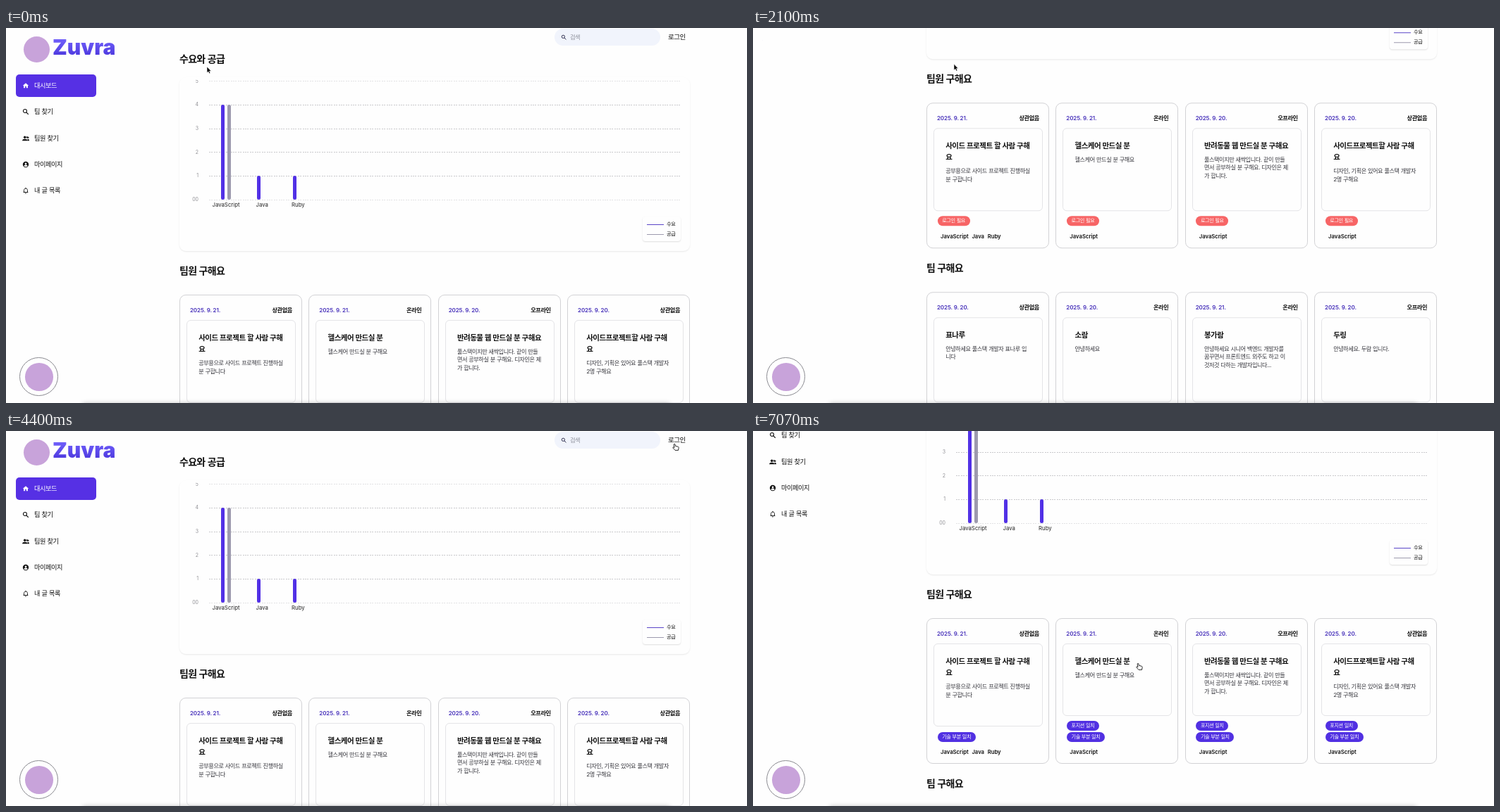
An HTML page for the animation above (7240 ms loop, 1051 px wide and 533 px high).

```html
<!DOCTYPE html>
<html lang="ko">
<head>
<meta charset="utf-8">
<title>Dashboard</title>
<style>
html, body { margin: 0; width: 100%; height: 100%; overflow: hidden; background: #fefefe; }
#stage { position: relative; width: 1051px; height: 533px; overflow: hidden; color: #111;
  font-family: Inter, "Noto Sans CJK KR", "Noto Sans CJK", sans-serif; }
#stage div, #stage svg { position: absolute; box-sizing: border-box; }
#page { left: 0; top: 0; width: 1051px; height: 901px; }
.t { white-space: pre; line-height: 20px; }
.ko { letter-spacing: -.05em; word-spacing: .04em; }
.word { font-weight: 900; background: linear-gradient(#6d5cf8 25%, #4f3be0 80%);
  -webkit-background-clip: text; background-clip: text; color: transparent; }
.mark { border-radius: 50%; background: #c8a3da; }
.pill { height: 14px; line-height: 14px; padding: 0 6.7px; border-radius: 7px; color: #fff;
  font-size: 7.1px; white-space: pre; background: #5130e2; }
.out .pill { background: #f76566; }
#page.logged .out, #page:not(.logged) .in { display: none; }
#page.logged .short { height: 103px !important; }
.card { border: 1px solid #d2d2d5; border-radius: 9px; background: #fefefe; }
.inner { border: 1px solid #e4e4e7; border-radius: 6px; }
.chart { border-radius: 9px; background: #fefefe; box-shadow: 0 1px 2px rgba(0,0,0,.09); }
.legend { border-radius: 4px; background: #fefefe; box-shadow: 0 1px 2px rgba(0,0,0,.13); }
#dock { left: 110px; top: 535px; width: 830px; height: 10px; box-shadow: 0 0 7px 1px rgba(0,0,0,.3); }
#chat { left: 19px; top: 468px; width: 55px; height: 55px; border: .7px solid #8a8a90;
  border-radius: 50%; background: #fefefe; }
#shade { left: 0; top: 0; width: 1051px; height: 533px; background: rgba(0,0,0,.44); }
#box { left: 398px; top: 176px; width: 255px; height: 177px; border-radius: 6px; background: #fff;
  box-shadow: 0 3px 9px rgba(0,0,0,.15); }
#cursor { left: 0; top: 0; width: 16px; height: 16px; overflow: visible; }
</style>
</head>
<body>
<div id="stage">
  <div id="page"></div>
  <div id="dock"></div>
  <div id="chat"></div>
  <div id="modal"><div id="shade"></div><div id="box"></div></div>
  <svg id="cursor" viewBox="0 0 16 16">
    <path id="arrow" d="M0 0V8.6L2 6.9 3.3 9.8 4.8 9.1 3.5 6.3H6Z" fill="#000" stroke="#fff" stroke-width=".6"/>
    <path id="hand" d="M1.2 1.2C1.2 0 2.8 0 3 1.1L3.5 3.4 6.9 4.2C8 4.5 8.3 5.2 8.1 6.2L7.5 9.4H3L0.1 6.2C-.6 5.2.5 4.5 1.2 5.1L2 5.6Z"
      fill="#fff" stroke="#111" stroke-width=".9" stroke-linejoin="round"/>
  </svg>
</div>
<script>
const LOOP = 7240, STEP = 100;
const $ = id => document.getElementById(id);
const page = $('page'), modal = $('modal'), box = $('box');
const PURPLE = '#5130e6', GRAY = '#9d9aae';

function add(parent, cls, x, y, w, h, style = '') {
  const el = document.createElement('div');
  el.className = cls;
  el.style.cssText = `left:${x}px;top:${y}px;` + (w ? `width:${w}px;height:${h}px;` : '') + style;
  parent.appendChild(el);
  return el;
}

// y is the middle of the line; align moves the anchor along x
function text(parent, str, x, y, size, { weight = 400, color = '#111', align = 0, spacing } = {}) {
  const ko = /[가-힣]/.test(str) ? ' ko' : '';
  const el = add(parent, 't' + ko, x, y - 10, 0, 0,
    `font-size:${size}px;font-weight:${weight};color:${color};transform:translateX(${-align * 100}%);`
    + (spacing ? `letter-spacing:${spacing}em;` : ''));
  el.textContent = str;
  return el;
}

function svg(parent, x, y, size, body) {
  parent.insertAdjacentHTML('beforeend',
    `<svg viewBox="0 0 24 24" style="left:${x - size / 2}px;top:${y - size / 2}px;width:${size}px;height:${size}px">${body}</svg>`);
  return parent.lastElementChild;
}

function brand(parent, cx, cy, r, x, y, size) {
  add(parent, 'mark', cx - r, cy - r, 2 * r, 2 * r);
  add(parent, 'word', x, y - 18, 0, 0, `font-size:${size}px;line-height:36px`).textContent = 'Zuvra';
}

const searchIcon = '<g fill="none" stroke="currentColor" stroke-width="2.6"><circle cx="9.5" cy="9.5" r="6"/><path d="M14 14l7 7"/></g>';
const icons = [
  '<path fill="currentColor" d="M10 20v-6h4v6h5v-8h3L12 3 2 12h3v8z"/>',
  searchIcon,
  '<g fill="currentColor"><circle cx="9" cy="8" r="4.3"/><path d="M0 20c0-8 18-8 18 0zM18 20h6c0-4-2-6-6-6zM15 4a4 4 0 1 1 0 8zM19 6h2v6h-2zM17 8h6v2h-6z"/></g>',
  '<circle cx="12" cy="12" r="10" fill="currentColor"/><g fill="#fff"><circle cx="12" cy="9" r="3.3"/><path d="M5.5 17c2-5 11-5 13 0-3 4-10 4-13 0z"/></g>',
  '<path fill="none" stroke="currentColor" stroke-width="2.2" d="M4 18h16M6 18v-7c0-8 12-8 12 0v7M10 21.5h4M12 2v3"/>'
];

// Sidebar and top bar
brand(page, 43, 30, 18.5, 66, 27, 30);
const active = add(page, '', 14, 65.5, 114, 32.5, 'border-radius:5px;background:#5630e4');
const nav = ['대시보드', '팀 찾기', '팀원 찾기', '마이페이지', '내 글 목록'].map((label, i) => {
  const y = 82 + i * 37.35;
  return [svg(page, 28, y, 10, icons[i]), text(page, label, 40, y, 9.2)];
});
add(page, '', 778, 1, 150, 23.5, 'border-radius:12px;background:#f1f4fc');
svg(page, 791.5, 13, 8.5, searchIcon).style.color = '#222244';
text(page, '검색', 800, 13, 8.2, { color: '#8b8e99' });
text(page, '로그인', 939, 13, 9.5);

// Chart
const heading = (str, y) => text(page, str, 246, y, 14, { weight: 700 });
heading('수요와 공급', 43.5);
add(page, 'chart', 246, 70, 724, 247);
for (let v = 0; v <= 5; v++) {
  const y = 244 - v * 33.65;
  add(page, '', 288, y - .5, 669, 1,
    `background:repeating-linear-gradient(90deg,${v % 5 ? '#c9c9cc' : '#e2e2e4'} 0 2px,transparent 2px 3.4px)`);
  const label = text(page, v ? String(v) : '00', 273, y, 7, { color: '#8f8f94', align: 1 });
  if (v === 5) label.style.clipPath = 'inset(8px 0 0 0)';
}
const bar = (x, v, color) => add(page, '', x, 244 - v * 33.65, 5, v * 33.65, `border-radius:2.5px;background:${color}`);
bar(304.5, 4, PURPLE);
bar(314, 4, GRAY);
bar(356, 1, PURPLE);
bar(407.3, 1, PURPLE);
['JavaScript', 'Java', 'Ruby'].forEach((s, i) =>
  text(page, s, 312 + i * 51.2, 250.7, 7.8, { color: '#222', align: .5 }));
add(page, 'legend', 902.5, 268, 54.5, 34.5);
[['수요', '#5a45c8'], ['공급', GRAY]].forEach(([s, c], i) => {
  add(page, '', 909, 278.5 + i * 14, 24, 1.3, `background:${c}`);
  text(page, s, 937, 279.3 + i * 14, 7.2);
});

// Cards: day, place, title lines, description lines, skills, sprout
const ANY = '상관없음', ON = '온라인', OFF = '오프라인', JS = 'JavaScript';
const members = [
  [21, ANY, '사이드 프로젝트 할 사람 구해|요', '공부용으로 사이드 프로젝트 진행하실|분 구합니다', [JS, 'Java', 'Ruby']],
  [21, ON, '헬스케어 만드실 분', '헬스케어 만드실 분 구해요', [JS]],
  [20, OFF, '반려동물 웹 만드실 분 구해요', '풀스택이지만 새싹입니다. 같이 만들|면서 공부하실 분 구해요. 디자인은 제|가 합니다.', [JS]],
  [20, ANY, '사이드프로젝트할 사람 구해|요', '디자인, 기획은 있어요 풀스택 개발자|2명 구해요', [JS]]
];
const teams = [
  [20, ANY, '표나루', '안녕하세요 풀스택 개발자 표나루 입|니다', [JS, 'TypeScript', 'Python']],
  [20, ON, '소람', '안녕하세요', [JS, 'C++']],
  [21, ON, '봉가람', '안녕하세요 시니어 백엔드 개발자를|꿈꾸면서 프론트엔드 외주도 하고 이|것저것 다하는 개발자입니다...', [JS], true],
  [20, OFF, '두링', '안녕하세요. 두람 입니다.', [JS], true]
];
const sprout = '<path d="M12 23V11" stroke="#3d9a3a" stroke-width="3"/><path fill="#4db848" d="M12 12C11 4 6 2 0 3c1 7 6 10 12 9zM12 12c1-8 6-10 12-9-1 7-6 10-12 9z"/>';

function card([day, place, title, desc, skills, young], i, top, isMember) {
  const c = add(page, 'card', 246 + i * 183.35, top, 174, 207);
  const g = add(c, '', -.5, -.5, 174, 206);
  add(g, 'inner' + (isMember && i ? ' short' : ''), 9.5, 35.5, 155, isMember ? 118 : 121);
  text(g, `2025. 9. ${day}.`, 14.5, 21, 8, { weight: 600, color: '#4630ba', spacing: -.015 });
  text(g, place, 159.5, 21, 8.2, { weight: 600, align: 1 });
  let y = 61;
  title.split('|').forEach(s => { text(g, s, 26.7, y, 10.5, { weight: 700 }); y += 16.3; });
  y += 2.7;
  desc.split('|').forEach(s => { text(g, s, 26.7, y, 8.15, { color: '#33333a' }); y += 11.7; });
  const row = add(g, 't', 19.5, 180, 0, 0, 'display:flex;gap:4.7px;font-size:7.7px;font-weight:600');
  skills.forEach(s => { row.appendChild(document.createElement('span')).textContent = s; });
  if (young) svg(g, 20, 169.5, 10, sprout);
  if (!isMember) return;
  const pill = (when, s, py) => { add(add(g, when, 0, 0), 'pill ko', 15, py).textContent = s; };
  pill('out', '로그인 필요', 160);
  if (i) pill('in', '포지션 일치', 145.5);
  pill('in', '기술 부분 일치', 161);
}
heading('팀원 구해요', 345);
members.forEach((m, i) => card(m, i, 379, true));
heading('팀 구해요', 614);
teams.forEach((m, i) => card(m, i, 648, false));

brand(page, 23, 888, 8, 36, 887, 14.5);
text(page, '© 2025 Your Company. All rights reserved.', 1041.5, 886.5, 7.65, { color: '#75757b', align: 1 });

// Floating helper and sign-in dialog
add($('chat'), 'mark', 7, 7, 39.6, 39.6);
add(box, '', 34, 13.5, 186.5, 33, 'border-radius:14px;background:#e8e8e8');
add(box, '', 58, 45.5, 13, 6, 'background:#e8e8e8;clip-path:polygon(0 0,100% 0,60% 100%)');
text(box, '루보미 로그인으로 간편하게 시작할 수 있어요!', 127.3, 30, 9.3, { weight: 500, align: .5 });
brand(box, 75.5, 82.5, 20, 101, 80, 32.5);
add(box, '', 15, 129, 225, 34, 'border-radius:5px;background:#fee500');
add(box, '', 26, 139.5, 13, 13, 'border-radius:50%;background:#111');
text(box, '루보미 로그인', 135, 146, 11.1, { color: '#2a2610', align: .5 });

// Timeline: [time, values...], eased between rows
const scrollKeys = [[0, 0], [400, 0], [1500, 124], [1600, 124], [1700, 126], [2400, 368],
  [2700, 368], [3720, 0], [6600, 0], [6900, 113], [LOOP, 113]];
const cursorKeys = [[0, 285, 55], [1700, 285, 55], [2300, 285, 50], [3800, 285, 50], [4300, 949, 18],
  [4700, 949, 18], [5200, 547, 330], [LOOP, 547, 330]];

function at(keys, t) {
  const i = Math.max(1, keys.findIndex(k => k[0] > t));
  const a = keys[i - 1], b = keys[i];
  const p = (t - a[0]) / (b[0] - a[0]), e = p * p * (3 - 2 * p);
  return a.slice(1).map((v, n) => v + (b[n + 1] - v) * e);
}
const within = (t, a, b) => t >= a && t < b;

function draw(now) {
  const t = Math.floor(now % LOOP / STEP) * STEP;
  const [scroll] = at(scrollKeys, t), [x, y] = at(cursorKeys, t);
  const open = within(t, 4600, 5500);
  const pointing = within(t, 3000, 3500) || within(t, 4300, 4600) || t >= 6700;

  page.style.transform = `translateY(${-scroll}px)`;
  page.classList.toggle('logged', t >= 5500);
  modal.style.display = open ? '' : 'none';
  active.style.display = open ? 'none' : '';
  nav[0].forEach(el => { el.style.color = open ? '#111' : '#fff'; });
  $('cursor').style.transform = `translate(${x - (pointing ? 3 : 0)}px,${y}px)`;
  $('hand').style.display = pointing ? '' : 'none';
  $('arrow').style.display = pointing ? 'none' : '';
}

const start = performance.now();
function tick() {
  draw(performance.now() - start);
  requestAnimationFrame(tick);
}
tick();
</script>
</body>
</html>
```
